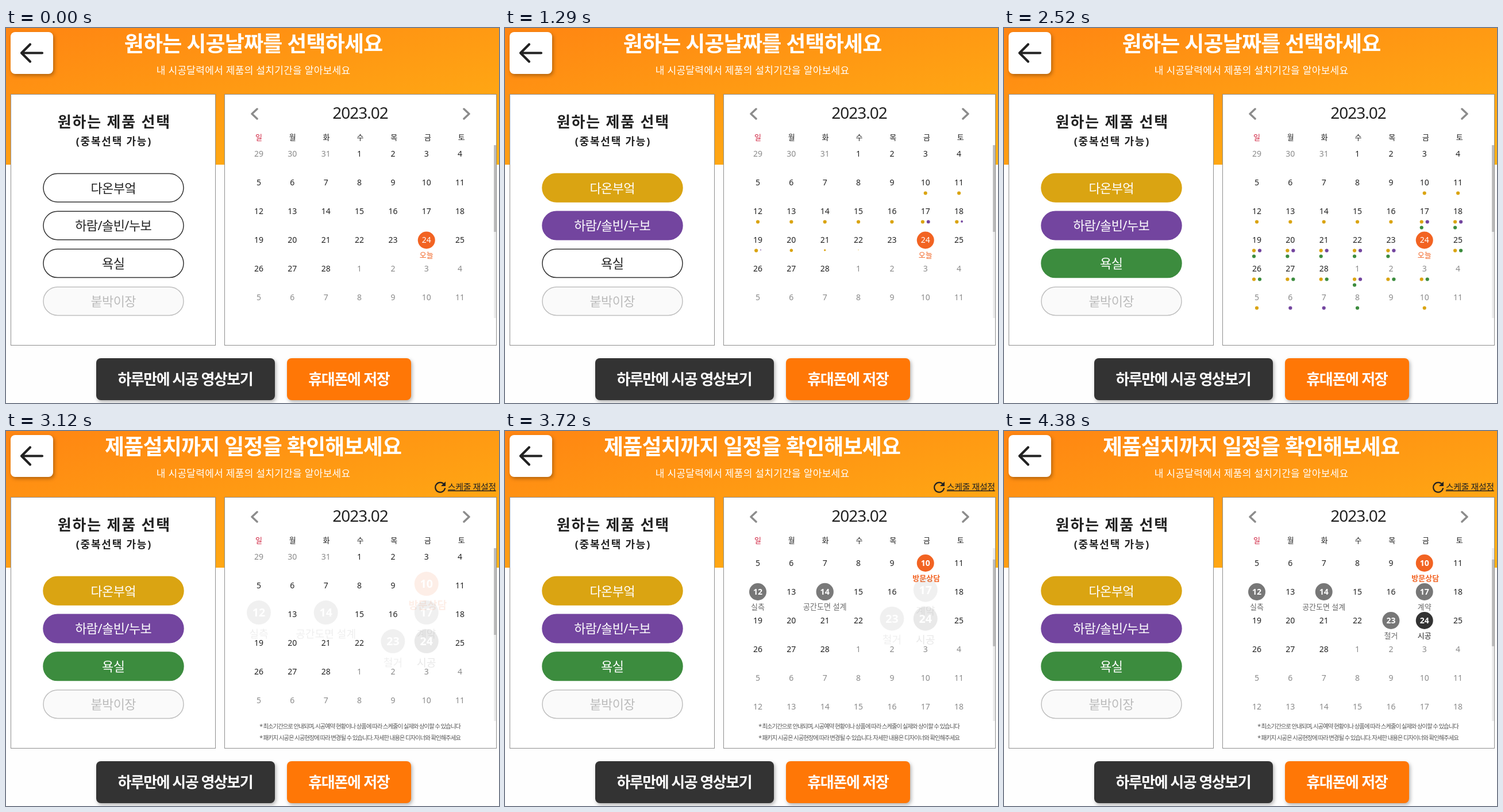
An HTML page that plays this animation: 858x653 px, repeating every 5070 ms.

```html
<!DOCTYPE html>
<html lang="ko">
<head>
<meta charset="utf-8">
<style>
  html, body { margin: 0; width: 100%; height: 100%; overflow: hidden; background: #fefefe; }
  .top {
    position: absolute; left: 0; top: 0; width: 858px; height: 238px;
    background: linear-gradient(167deg, #ff8512, #ffb314);
  }
  svg {
    position: absolute; left: 0; top: 0; width: 858px; height: 653px;
    font-family: "Noto Sans", "Noto Sans CJK KR", "Noto Sans CJK", sans-serif;
  }
  .panel { fill: #fff; stroke: #8e8e8e; }
  .raised { filter: drop-shadow(2px 3px 3px rgba(0, 0, 0, .3)); }
  .line { fill: none; stroke-linecap: round; stroke-linejoin: round; }
</style>
</head>
<body>
<div class="top"></div>
<svg id="stage" viewBox="0 0 858 653">
  <defs><clipPath id="view"><rect x="381" y="204" width="468" height="301"/></clipPath></defs>
  <rect class="raised" x="8" y="7" width="74" height="73" rx="8" fill="#fff"/>
  <path class="line" d="M42 28.500L27 43.500L42 58.500M27 43.500H63" stroke="#222" stroke-width="4.200"/>
  <rect class="panel" x="8.500" y="115.500" width="356" height="437"/>
  <rect class="panel" x="380.500" y="115.500" width="473" height="437"/>
  <rect class="raised" x="157" y="575" width="311" height="73" rx="8" fill="#333"/>
  <rect class="raised" x="489" y="575" width="216" height="73" rx="8" fill="#ff7706"/>
  <path class="line" d="M437 141L428 149.500L437 158M797 141L806 149.500L797 158" stroke="#8c8c8c" stroke-width="3.500"/>
  <rect x="849" y="204" width="4" height="301" fill="#ececec"/>
  <rect id="thumb" x="849" y="204" width="4" height="151" fill="#bdbdbd"/>
</svg>
<script>
const LOOP = 5070, SECOND_SCENE = 3120;
const STARTS = [660, 1150, 1660];
const COLORS = ['#daa412', '#73459f', '#3c8c3e'];
const ORANGE = '#f26322';
const stage = document.getElementById('stage');
const thumb = document.getElementById('thumb');

function add(parent, tag, attrs) {
  const el = document.createElementNS('http://www.w3.org/2000/svg', tag);
  for (const key in attrs) el.setAttribute(key, attrs[key]);
  parent.append(el);
  return el;
}

// x is the middle of the visible text; the trailing letter gap is compensated
function label(parent, str, x, y, size, fill, weight = 400, gap = 0) {
  const el = add(parent, 'text', {
    x: x + gap / 2, y, fill, 'font-size': size, 'font-weight': weight,
    'letter-spacing': gap, 'text-anchor': 'middle'
  });
  el.textContent = str;
  return el;
}

const clamp = v => Math.max(0, Math.min(1, v));
const range = (a, b) => Array.from({ length: b - a + 1 }, (_, i) => a + i);
const show = (el, on) => el.setAttribute('visibility', on ? 'visible' : 'hidden');

// Fixed text
label(stage, '내 시공달력에서 제품의 설치기간을 알아보세요', 430.5, 80, 17, '#fff', 400, .3);
label(stage, '원하는 제품 선택', 187.5, 173, 26, '#222', 700, 1.8);
label(stage, '(중복선택 가능)', 187, 204, 18, '#222', 700, 1.8);
label(stage, '하루만에 시공 영상보기', 312.5, 621, 26, '#fff', 700, -1.5);
label(stage, '휴대폰에 저장', 597.5, 621, 26, '#fff', 700, -1.3);
label(stage, '2023.02', 617, 158, 28, '#222', 500, -1);
[...'일월화수목금토'].forEach((d, i) =>
  label(stage, d, 440 + 58.8 * i, 195, 13, i ? '#222' : '#cf1f3d', 500));

// Product buttons
const buttons = ['다온부엌', '하람/솔빈/누보', '욕실', '붙박이장'].map((name, i) => {
  const y = 253.5 + 65.8 * i, off = i === 3;
  return {
    box: add(stage, 'rect', {
      x: 65, y, width: 244, height: 49.5, rx: 24.75, 'stroke-width': 1.5,
      fill: off ? '#fafafa' : '#fff', stroke: off ? '#c0c0c0' : '#333'
    }),
    text: label(stage, name, 187, y + 33, 22, off ? '#bbb' : '#222', 400, -.6)
  };
});

// Scene layers
const sceneA = add(stage, 'g', {}), sceneB = add(stage, 'g', {});
const grid = add(add(stage, 'g', { 'clip-path': 'url(#view)' }), 'g', {});
const gridA = add(grid, 'g', {}), gridB = add(grid, 'g', {});

label(sceneA, '원하는 시공날짜를 선택하세요', 431, 41, 37, '#fff', 700, -.8);
label(sceneB, '제품설치까지 일정을 확인해보세요', 430.5, 41, 37, '#fff', 700, -.8);
label(sceneB, '스케줄 재설정', 811, 102.5, 15, '#222', 500, -.4)
  .setAttribute('text-decoration', 'underline');
add(sceneB, 'path', { class: 'line', d: 'M762.500 93A8.500 8.500 0 1 0 764 100', stroke: '#222', 'stroke-width': 2.2 });
add(sceneB, 'path', { d: 'M765 88V96H757Z', fill: '#222' });
label(sceneB, '* 최소기간으로 안내되며, 시공예약 현황이나 상품에 따라 스케줄이 실제와 상이할 수 있습니다', 616.5, 518, 10.5, '#555', 400, -1.1);
label(sceneB, '* 패키지 시공은 시공현장에 따라 변경될 수 있습니다. 자세한 내용은 디자이너와 확인해주세요', 616.5, 538, 10.5, '#555', 400, -1.1);

// Calendar cells, counted from January 29
const colX = cell => 440 + 58.35 * (cell % 7);
const rowY = cell => 219 + 50 * Math.floor(cell / 7);
const dayOf = cell => cell < 3 ? 29 + cell : cell < 31 ? cell - 2 : cell - 30;
const feb = day => day + 2;
const TODAY = feb(24);

const steps = [
  [10, '방문상담', ORANGE, ORANGE, 700],
  [12, '실측', '#777', '#666', 500],
  [14, '공간도면 설계', '#777', '#666', 500],
  [17, '계약', '#777', '#666', 500],
  [23, '철거', '#777', '#666', 500],
  [24, '시공', '#333', '#222', 500]
];
const marked = steps.map(s => feb(s[0]));

range(0, 48).forEach(cell => {
  if (cell === TODAY) return;
  const dim = cell < 3 || cell > 30;
  label(marked.includes(cell) ? gridA : grid, dayOf(cell), colX(cell), rowY(cell) + 5, 14,
    dim ? '#8a8a8a' : '#222', dim ? 400 : 500);
});

add(gridA, 'circle', { cx: colX(TODAY), cy: rowY(TODAY) + .5, r: 15, fill: ORANGE });
label(gridA, 24, colX(TODAY), rowY(TODAY) + 5, 14, '#fff', 500);
label(gridA, '오늘', colX(TODAY), rowY(TODAY) + 31, 13, ORANGE);

const markers = steps.map(([day, name, fill, ink, weight]) => {
  const cell = feb(day), el = add(gridB, 'g', {});
  add(el, 'circle', { cx: 0, cy: .5, r: 15, fill });
  label(el, day, 0, 5.5, 14, '#fff', 600);
  label(el, name, day === 10 ? 1.5 : 0, 31.5, 13, ink, weight);
  return { el, x: colX(cell), y: rowY(cell) };
});

// Availability dots, each product sweeping through its days
const free = [
  [...range(12, 25), ...range(27, 33), 35, 40],
  [...range(19, 25), 31, 36, 37],
  [...range(19, 25), ...range(27, 33), 38]
];
const dots = {};
free.forEach((cells, p) => cells.forEach((cell, i) => {
  (dots[cell] ||= []).push({
    start: STARTS[p] + 50 * i,
    el: add(gridA, 'circle', { fill: COLORS[p], r: 0 })
  });
}));

function drawDots(t) {
  for (const cell in dots) {
    const list = dots[cell], x = colX(cell), y = rowY(cell) + 18.5;
    const size = list.map(d => clamp((t - d.start) / 150));
    const spread = size[1] > 0 ? 2 + 3 * size[1] : 0;
    list.forEach(({ el }, i) => {
      el.setAttribute('cx', i === 1 ? x + 5 : x - (i ? 5 : spread));
      el.setAttribute('cy', y + (i === 2 ? 10 : 0) - 1.5 * (1 - size[i]));
      el.setAttribute('r', 3.1 * size[i]);
    });
  }
}

function drawMarkers(t) {
  markers.forEach(({ el, x, y }, i) => {
    const p = 1 - (1 - clamp((t - 3125 - 212 * i) / 200)) ** 1.8;
    const s = 1.4 - .4 * p;
    el.setAttribute('transform', `translate(${x} ${y + 8.75}) scale(${s}) translate(0 -8.75)`);
    el.setAttribute('opacity', .1 + .9 * p);
  });
}

function draw(t) {
  const second = t >= SECOND_SCENE;
  [sceneA, gridA].forEach(el => show(el, !second));
  [sceneB, gridB].forEach(el => show(el, second));

  STARTS.forEach((start, i) => {
    const on = t >= start, { box, text } = buttons[i];
    box.setAttribute('fill', on ? COLORS[i] : '#fff');
    box.setAttribute('stroke', on ? COLORS[i] : '#333');
    text.setAttribute('fill', on ? '#fff' : '#222');
  });

  const scroll = 39.5 * clamp((t - SECOND_SCENE) / 520);
  grid.setAttribute('transform', `translate(0 ${-scroll})`);
  thumb.setAttribute('y', 204 + scroll / 2);

  if (second) drawMarkers(t);
  else drawDots(t);
}

function tick() {
  draw(performance.now() % LOOP);
  requestAnimationFrame(tick);
}
tick();
</script>
</body>
</html>
```
